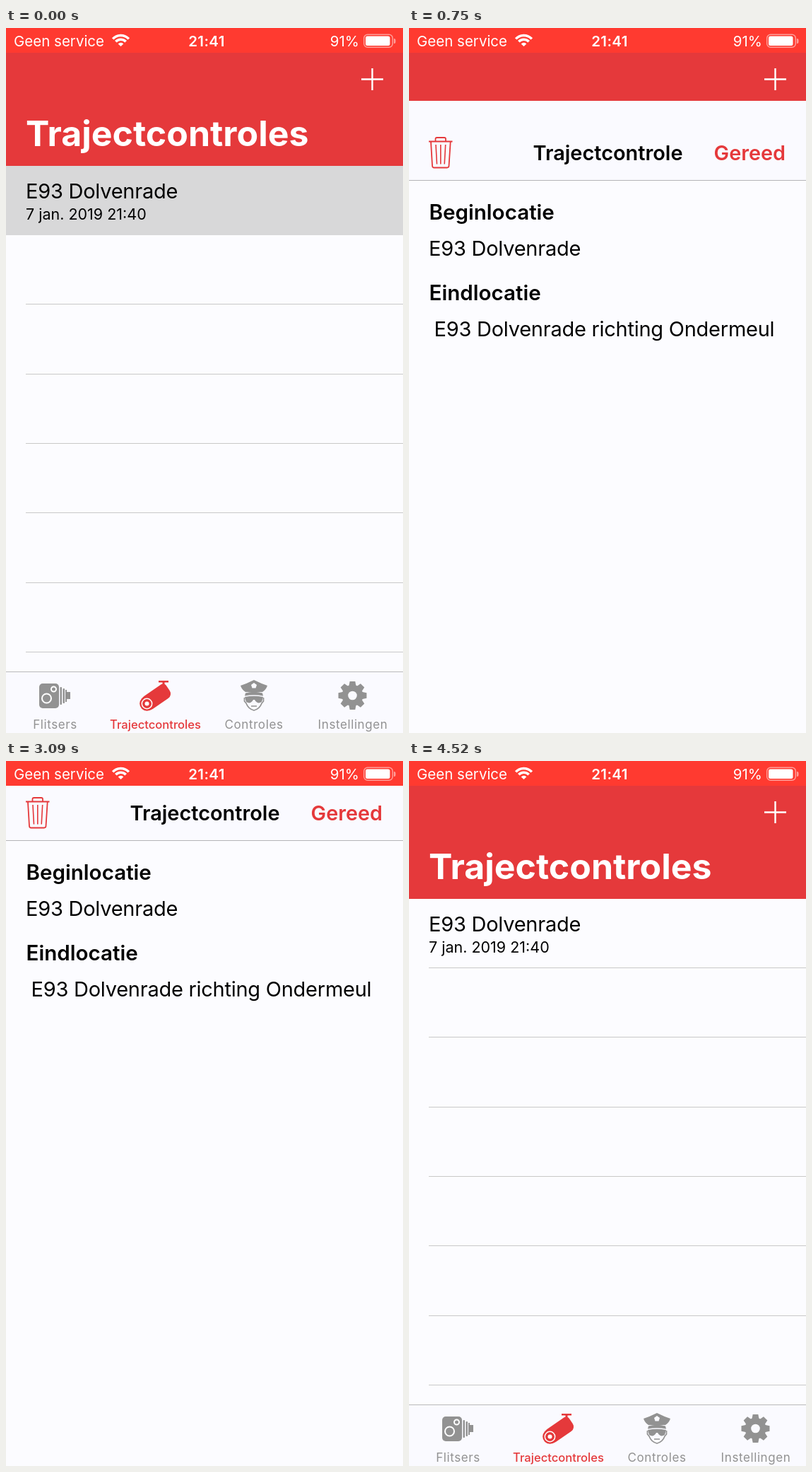
Animation, 562 px wide and 997 px high, one loop 4550 ms. Source, as an HTML page with a canvas:

```html
<!DOCTYPE html>
<html lang="nl">
<head>
<meta charset="utf-8">
<title>Trajectcontroles</title>
<style>
  html, body { margin: 0; width: 100%; height: 100%; overflow: hidden; background: #fcfcff; }
  canvas { display: block; }
</style>
</head>
<body>
<canvas id="stage" width="562" height="997"></canvas>
<script>
const W = 562, H = 997, LOOP = 4550;
const RED = '#e5393b', STATUS = '#ff3a30', PAPER = '#fcfcff', BAR = '#fafaff', GREY = '#929292';
const PLACE = 'E93 Dolvenrade';
const ctx = document.getElementById('stage').getContext('2d');

// Times at which a slide advances: one lead beat, a run of 50 ms beats, then the tail.
function beats(start, lead, count, tail) {
  const times = [start];
  for (const gap of [lead, ...Array(count).fill(50), ...tail]) times.push(times.at(-1) + gap);
  return times;
}
const RISE = [...beats(50, 20, 8, [20]), ...beats(590, 20, 8, [20, 20]), ...beats(1150, 30, 8, [30])];
const FALL = [...beats(3090, 20, 8, [20]), ...beats(3630, 20, 8, [20, 20]), ...beats(4190, 20, 5, [30, 30])];

const passed = (times, t) => times.filter(x => x <= t).length;

// Distance still to go for a critically damped spring.
function rest(phase) {
  const p = Math.max(0, phase);
  return Math.floor(H * (1 + p) * Math.exp(-p) + 0.2);
}

function sheetTop(t) {
  if (t < FALL[0]) return rest(2.93 + 0.304 * (passed(RISE, t) - 12));
  return H - rest(0.324 * (passed(FALL, t) - 1));
}

function rect(x, y, w, h, color) {
  ctx.fillStyle = color;
  ctx.fillRect(x, y, w, h);
}

function round(x, y, w, h, r, color) {
  ctx.fillStyle = color;
  ctx.beginPath();
  ctx.roundRect(x, y, w, h, r);
  ctx.fill();
}

function circle(x, y, r, color, line) {
  ctx.beginPath();
  ctx.arc(x, y, r, 0, Math.PI * 2);
  if (line) stroke(null, color, line);
  else { ctx.fillStyle = color; ctx.fill(); }
}

function stroke(d, color, width) {
  ctx.strokeStyle = color;
  ctx.lineWidth = width;
  if (d) ctx.stroke(new Path2D(d));
  else ctx.stroke();
}

function fill(d, color) {
  ctx.fillStyle = color;
  ctx.fill(new Path2D(d));
}

function text(str, x, y, size, { weight = 400, color = '#000', align = 'left', space = 0 } = {}) {
  ctx.font = `${weight} ${size}px Inter, Roboto, sans-serif`;
  ctx.letterSpacing = space + 'px';
  ctx.textAlign = align;
  ctx.fillStyle = color;
  ctx.fillText(str, x, y);
}

function statusBar() {
  rect(0, 0, W, 35, STATUS);
  const color = '#fff';
  text('Geen service', 11, 26, 20.5, { color });
  text('21:41', 284, 26, 20.5, { color, weight: 600, align: 'center', space: 0.4 });
  text('91%', 500, 26, 20.5, { color, align: 'right' });

  for (const [r, line] of [[15.5, 3.6], [9.8, 3.6], [2.6, 5.2]]) {
    ctx.beginPath();
    ctx.arc(162.5, 26, r, -Math.PI * 0.76, -Math.PI * 0.24);
    stroke(null, color, line);
  }

  ctx.beginPath();
  ctx.roundRect(506.8, 9.2, 40.5, 18, 5);
  stroke(null, 'rgba(255,255,255,.5)', 1.5);
  round(509, 11.5, 34.5, 13.5, 2.5, color);
  round(549, 15, 2.5, 7, [0, 2, 2, 0], 'rgba(255,255,255,.5)');
}

function speedCamera() {
  round(47, 927, 28, 35, 5, GREY);
  circle(57.5, 948, 6.5, '#fff', 2);
  circle(67.5, 935, 3.5, '#fff', 2);
  round(76.5, 932, 2.5, 25, 1, GREY);
  round(80.5, 934, 2.5, 21, 1, GREY);
  rect(84, 936, 2, 17, GREY);
  rect(86, 939, 5, 10, GREY);
}

function tubeCamera() {
  fill('M216 923H230V925.5H224.5V932H221.5V925.5H216Z', RED);
  ctx.save();
  ctx.translate(211, 947.5);
  ctx.rotate(-0.6);
  round(-22, -11, 45, 22, [11, 5, 8, 11], RED);
  ctx.restore();
  circle(199.5, 955.5, 10.3, RED);
  circle(199.5, 955.5, 7.2, '#fff', 1.5);
  circle(199.5, 955.5, 3, '#fff');
}

function officer() {
  fill('M332 930Q341 927 351 922Q361 927 370 930Q368 936 363 939H339Q334 936 332 930Z', GREY);
  fill('M351 926L355 929L353.5 933.5H348.5L347 929Z', BAR);
  fill('M339 940.5Q351 937 363 940.5L364 944.5Q351 942 338 944.5Z', GREY);
  fill('M338 946Q351 943.5 364 946L362 953Q356 957 352 950H350Q346 957 340 953Z', GREY);
  stroke('M337.5 947V952L340 955Q343 963 351 965Q359 963 362 955L364.5 952V947', GREY, 1.7);
  stroke('M347 959H355', GREY, 1.5);
}

function gear() {
  ctx.save();
  ctx.translate(490.5, 944);
  for (let i = 0; i < 8; i++) {
    fill('M-5.2 -13L-3.8 -20H3.8L5.2 -13Z', GREY);
    ctx.rotate(Math.PI / 4);
  }
  circle(0, 0, 15, GREY);
  circle(0, 0, 6.3, BAR);
  ctx.restore();
}

function tabBar() {
  rect(0, 910, W, 87, BAR);
  rect(0, 910, W, 1, '#b9b9b9');
  speedCamera();
  tubeCamera();
  officer();
  gear();
  const label = { color: GREY, align: 'center', space: 0.6 };
  text('Flitsers', 69.5, 991, 17, label);
  text('Trajectcontroles', 211.5, 991, 16.6, { ...label, color: RED, weight: 500, space: 0 });
  text('Controles', 351, 991, 17, label);
  text('Instellingen', 491, 991, 17, label);
}

function list(highlight) {
  rect(0, 0, W, H, PAPER);
  for (let i = 0; i < 7; i++) rect(28, Math.round(292 + i * 98.33), W - 28, 1, '#c9c9c8');
  if (highlight) {
    ctx.globalAlpha = highlight;
    rect(0, 195, W, 98, '#d8d8d9');
    ctx.globalAlpha = 1;
  }
  rect(0, 35, W, 160, RED);
  stroke('M503 72.5H534M518.5 57V88', '#fff', 2.4);
  text('Trajectcontroles', 28, 167, 50, { weight: 700, color: '#fff' });
  text(PLACE, 28, 240.5, 29, { space: -0.25 });
  text('7 jan. 2019 21:40', 28, 270.5, 21.5);
  tabBar();
}

function trash() {
  stroke('M28 57.5H61.5M37.5 57V54Q37.5 52 39.5 52H50Q52 52 52 54V57', RED, 1.8);
  stroke('M31 58L33 92Q33.2 94.5 35.5 94.5H54Q56.3 94.5 56.5 92L58.7 58', RED, 1.8);
  stroke('M38 62L39.5 89.5M44.8 62V89.5M51.7 62L50.2 89.5', RED, 1.6);
}

function sheet(top) {
  ctx.save();
  ctx.translate(0, top);
  rect(0, 0, W, H, PAPER);
  rect(0, 0, W, 112, BAR);
  rect(0, 112, W, 1, '#b4b4b7');
  trash();
  const bold = { weight: 600 };
  text('Trajectcontrole', 281.5, 84, 28.9, { ...bold, align: 'center' });
  text('Gereed', 533, 84, 28.8, { ...bold, color: RED, align: 'right' });
  text('Beginlocatie', 28.5, 168, 29.6, bold);
  text(PLACE, 28, 218.5, 29, { space: -0.25 });
  text('Eindlocatie', 28.5, 282, 29.6, bold);
  text(PLACE + ' richting Ondermeul', 35.5, 332.5, 29, { space: -0.25 });
  ctx.restore();
}

function draw(t) {
  const fade = Math.max(0, passed(RISE, t) - 2) * 0.03;
  list(t < FALL[0] ? Math.max(0, 1 - fade) : 0);
  const top = sheetTop(t);
  if (top < H) sheet(top);
  statusBar();
}

const begin = performance.now();
function tick() {
  draw((performance.now() - begin) % LOOP);
  requestAnimationFrame(tick);
}
tick();
</script>
</body>
</html>
```
